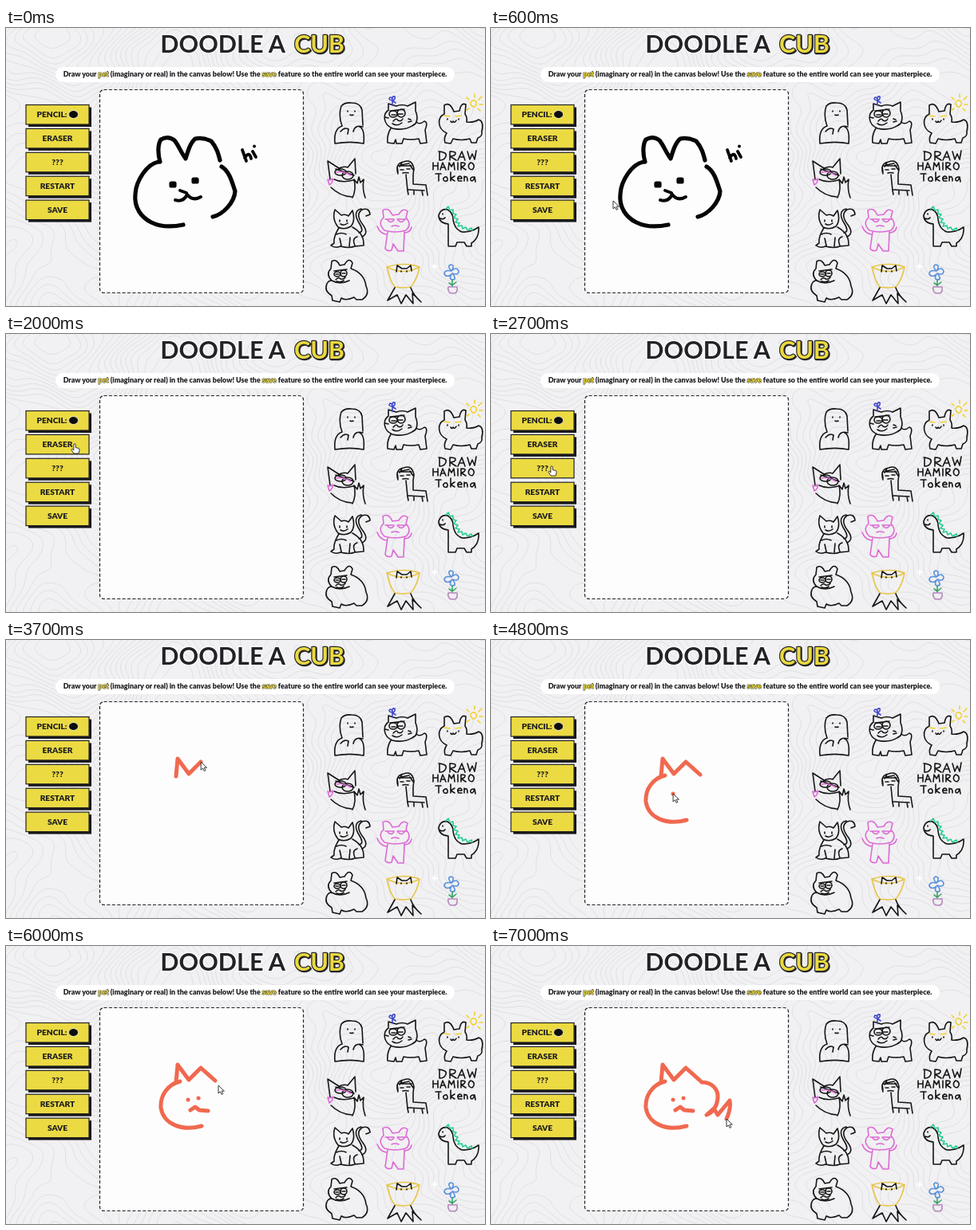
Animation, 600 px wide and 349 px high, one loop 7100 ms. Source, as an HTML page with a canvas:

```html
<!DOCTYPE html>
<html lang="en">
<head>
<meta charset="utf-8">
<title>Doodle a cub</title>
<style>
  html, body { margin: 0; width: 100%; height: 100%; overflow: hidden; background: #f1f0f2; }
  canvas, svg { position: absolute; left: 0; top: 0; width: 100%; height: 100%; display: block; }
  text { font-family: Lato, "Open Sans", sans-serif; font-weight: 900; fill: #1c1c20; }
  .title { font-size: 30.5px; font-weight: 700; paint-order: stroke; stroke-linejoin: round; }
  .dark { fill: #222228; stroke: #fff; stroke-width: 3px; }
  .gold { fill: #ead93f; stroke: #26262a; stroke-width: 2.4px; }
  .shade { fill: #26262a; }
  .intro { font-size: 8.92px; }
  .intro tspan { fill: #e6d43c; stroke: #333328; stroke-width: .9px; paint-order: stroke; }
  .button text { font-size: 10.2px; text-anchor: middle; }
  .line { fill: none; stroke: #151515; stroke-linecap: round; stroke-linejoin: round; }
  #pets { stroke-width: 1.6; }
  #bunny { stroke-width: 5.2; stroke: #060606; }
  #ink { stroke: #f0694f; stroke-width: 5; }
  .cursor { fill: #fff; stroke: #222; stroke-width: .9; stroke-linejoin: round; }
</style>
</head>
<body>
<canvas id="map" width="600" height="349"></canvas>
<svg viewBox="0 0 600 349" preserveAspectRatio="none">
  <text class="title dark" x="350" y="31" text-anchor="end">DOODLE A</text>
  <text class="title gold shade" x="362" y="32">CUB</text>
  <text class="title gold" x="361" y="31">CUB</text>
  <rect x="62" y="49" width="500" height="19" rx="9.5" fill="#fff"/>
  <text class="intro" x="312" y="61.3" text-anchor="middle">Draw your <tspan>pet</tspan> (imaginary or real) in the canvas below! Use the <tspan>save</tspan> feature so the entire world can see your masterpiece.</text>
  <rect x="117.5" y="77.5" width="255" height="255" rx="5" fill="#fefdfe" stroke="#222" stroke-width="1.2" stroke-dasharray="4 2.4"/>
  <g id="buttons"></g>
  <g id="pets" class="line"></g>
  <path d="M537,294l1,4l4,1l-4,1.5l-1,4l-1.5,-4l-4,-1.5l4,-1z" fill="#fff"/>
  <g id="bunny" class="line">
    <path d="M191,168C176,171 163,192 162,208C160,226 170,238 182,244C194,250 208,250 222,247"/>
    <path d="M193,168C190,158 190,146 194,140Q203,135 211,141C216,147 219,156 225,164C228,154 231,144 237,139Q247,137 257,142C264,150 266,158 268,166"/>
    <path d="M270,174C280,180 283,193 287,205C286,219 272,234 259,237"/>
    <path d="M207,195h4v3h-4zM235,190h4v3h-4z"/>
    <path d="M212,216Q222,219 227,209Q234,218 244,212M218,204L226,207L227,210" stroke-width="4"/>
    <path d="M296,153L301,167M299,163Q305,154 307,164M309,155l4,7M311,148.500h.1" stroke-width="3.8"/>
  </g>
  <g id="ink" class="line"></g>
  <path id="arrow" class="cursor" d="M0,0v10l2.400,-2.200l1.700,3.600l1.700,-.8l-1.700,-3.500h3.300z"/>
  <path id="hand" class="cursor" d="M-1.200,0.500Q0,-1 1.200,.5V4.500L5,5.500Q6.500,6 6,8L5,12H-1L-4,7.500Q-4,6 -2.500,6.500L-1.200,8z"/>
</svg>
<script>
const LOOP = 7100, FRAME = 100;
const $ = id => document.getElementById(id);
const clamp = v => Math.max(0, Math.min(1, v));

function add(parent, tag, attrs, text) {
  const el = document.createElementNS('http://www.w3.org/2000/svg', tag);
  for (const key in attrs) el.setAttribute(key, attrs[key]);
  if (text) el.textContent = text;
  parent.append(el);
  return el;
}

// Contour lines of a smooth field, by marching squares
function drawMap() {
  const ctx = $('map').getContext('2d'), step = 4;
  const field = (x, y) => {
    const u = x + 14 * Math.sin(y / 23) + 6 * Math.sin(y / 9 + x / 31);
    const v = y + 13 * Math.sin(x / 27) + 5 * Math.cos(x / 11 - y / 19);
    return 3.2 * (Math.sin(u / 43) + Math.cos(v / 37) + Math.sin((u + v) / 61) + .5 * Math.cos((u - 2 * v) / 53));
  };
  ctx.strokeStyle = '#e0dfe3';
  ctx.beginPath();
  for (let y = 0; y < 349; y += step) for (let x = 0; x < 600; x += step) {
    const c = [[x, y], [x + step, y], [x + step, y + step], [x, y + step]];
    const f = c.map(p => field(...p));
    for (let level = Math.ceil(Math.min(...f)); level <= Math.max(...f); level++) {
      const cuts = [];
      for (let i = 0; i < 4; i++) {
        const j = (i + 1) % 4;
        if ((f[i] < level) === (f[j] < level)) continue;
        const k = (level - f[i]) / (f[j] - f[i]);
        cuts.push([c[i][0] + k * (c[j][0] - c[i][0]), c[i][1] + k * (c[j][1] - c[i][1])]);
      }
      if (cuts.length > 1) {
        ctx.moveTo(...cuts[0]);
        ctx.lineTo(...cuts[1]);
      }
    }
  }
  ctx.stroke();
}

// Label, then when the pointer enters and leaves, if it does
const buttons = [
  ['PENCIL:', 1100, 1600], ['ERASER', 1750, 2150], ['???', 2350, 2900], ['RESTART', 750, 1150], ['SAVE']
].map(([label, enter = LOOP, leave = LOOP], i) => {
  const y = 96.5 + 29.9 * i;
  const g = add($('buttons'), 'g', { class: 'button' });
  const box = { x: 25, y, width: 79, height: 24.5 };
  const shadow = add(g, 'rect', { ...box, fill: '#17171a' });
  add(g, 'rect', { ...box, fill: '#ebda42', stroke: '#222', 'stroke-width': 1.2 });
  add(g, 'text', { x: i ? 64.5 : 57.5, y: y + 15.5 }, label);
  if (!i) add(g, 'ellipse', { cx: 84.5, cy: 108.5, rx: 6, ry: 5, fill: '#0c0c0c', stroke: '#f6f0c0' });
  return { shadow, enter, leave };
});

const BLUE = '#3f48cc', SKY = '#5b92dc', PINK = '#dd6ad6', GOLD = '#e8c648', SUN = '#f2d230', GREEN = '#22cf8e';
// Each pet: path, or [path, colour], in drawing order
const pets = [
  ['M421,123C417,113 418,103 420,98Q424,93 433,94Q444,94 446,103L447,122M421,123C412,126 411,135 412,145C424,143 438,143 448,145C449,134 448,126 443,124M419,130Q424,124 429,127L428,133M447,124Q437,121 435,130M428,104v1M437,104v1M431,109q2,1 4,0'],
  ['M484,126C472,121 472,108 479,103L479,95L489,98Q496,95 503,98L513,93L513,104Q517,113 513,120Q500,130 484,126M514,118Q518,122 524,117Q529,118 525,128L527,144L519,145L517,139Q506,141 498,139L496,145H489L488,140L486,145L478,144Q477,134 482,126',
   'M480,108a5,4 0 1 0 10,0a5,4 0 1 0 -10,0M490,107a5,5 0 1 0 10,0a5,5 0 1 0 -10,0M481,104L499,102M483,109h5M491,108h6M485,117q4,-5 6,-1q4,2 6,-2M484,120q6,4 12,-1M475,112l4,1M504,114l3,1M504,118l4,-1',
   ['M484,97v-6M484,91q-6,-1 -3,-4q3,0 3,4q-1,-6 3,-5q1,4 -3,5l4,3', BLUE]],
  ['M552,132C541,127 539,113 549,108L549,97Q556,92 561,105L568,104Q570,93 576,96L575,108Q578,112 577,118Q586,119 592,115Q599,117 596,130Q597,136 591,138L589,144H583L581,139Q570,142 560,139L557,145L550,144Q548,138 552,132M553,114v1M567,114v1M557,117q2,3 3,0q2,3 4,-1',
   ['M549,110l7,1M563,111l7,-1M582,95q0,-5 5,-4q5,3 0,8q-4,0 -5,-4M587,87v-4M592,90l4,-4M593,96h4M591,101l3,3M580,101l-3,2M580,90l-3,-3', SUN]],
  ['M406,190L403,167L417,176Q424,173 428,175L437,164L438,183M412,181a7,4 0 1 0 14,0a7,4 0 1 0 -14,0M421,185a7,5 0 1 0 14,0a7,5 0 1 0 -14,0M413,177L436,185M407,200Q418,211 433,212M434,213Q439,203 436,190l4,5l2,-8l2,7l4,-4Q446,202 450,213M411,190q10,5 24,1',
   ['M403,190q4,2 6,-1q1,5 -4,8zM414,181q8,-2 18,4', PINK]],
  ['M491,183Q487,170 498,168Q509,164 511,177L510,184M491,181l-1,-7M493,174l3,-5M495,172l10,-2M506,172l4,6M494,178h4M502,177h4M497,182q4,-1 7,0M501,184L503,204L504,209M510,184L510,196L526,197L528,210M504,203L524,204M511,204V209M521,204L522,210M492,173L508,173'],
  ['M543,155v11M542,155Q553,156 551,161Q549,166 543,166M556,166v-11q8,0 7,3q-1,3 -7,3l8,5M566,166l5,-11l4,11M568,162h6M578,155l3,10l3,-7l3,7l2,-11',
   'M535,169v9M541,169v9M535,173h6M544,178l3,-9l4,9M545,175h5M554,178l1,-9l3,5l3,-5l1,9M566,169v9M570,178v-9q6,0 5,2q-1,3 -5,3l6,4M582,169q-4,3 -2,7q4,4 6,-1q1,-5 -4,-6',
   'M538,183h7M542,183v9M550,187q-4,2 -1,5q5,1 4,-3q-1,-3 -3,-2M557,181v11M562,186l-5,3l5,3M566,189h5q0,-3 -3,-3q-4,2 -1,6h4M574,192v-6M574,188q4,-4 4,4M586,187q-5,0 -4,4q3,3 5,-4l1,6'],
  ['M416,250Q408,240 412,228L420,235Q425,233 429,236L434,229Q438,242 432,249Q424,254 416,250M417,251Q410,262 411,270L407,273Q412,277 419,274Q430,277 437,274L448,273Q449,258 434,250M418,241v2M427,241v2M419,246q4,3 9,-1M420,273l-2,-9M430,274l1,-11M437,273Q433,264 440,262M414,259q6,-3 12,0',
   'M446,262Q455,258 447,247Q437,234 446,228Q455,225 456,234L451,236M442,257Q449,256 443,246Q433,230 445,227'],
  ['M474,254Q465,245 473,238L472,229Q479,224 484,235L492,234Q497,225 503,230L501,238Q509,247 501,254Q487,258 474,254M475,240h11M490,240h12M478,241q4,5 8,0M491,241q4,5 8,0M483,249q4,-2 9,0M478,256L475,277Q478,281 483,279L485,271L491,280H498L499,256M477,259Q468,258 465,249M500,257Q507,256 508,250', PINK].slice(0, 0)
].slice(0, 7).concat([
  [['M474,254Q465,245 473,238L472,229Q479,224 484,235L492,234Q497,225 503,230L501,238Q509,247 501,254Q487,258 474,254M475,240h11M490,240h12M478,241q4,5 8,0M491,241q4,5 8,0M483,249q4,-2 9,0M478,256L475,277Q478,281 483,279L485,271L491,280H498L499,256M477,259Q468,258 465,249M500,257Q507,256 508,250', PINK]],
  ['M554,273L554,246Q542,245 542,235Q545,226 553,228Q560,232 560,240Q561,252 571,256Q582,257 592,250Q593,264 583,270V274H577L574,269H565L563,274H554M547,233v1M544,239q4,2 6,-1',
   ['M551,227l3,-3l2,5l4,-1l0,5l4,1l-3,4l5,2l-3,4l5,1l-2,4l5,-1l1,4l4,-2l2,4l5,-3l1,3', GREEN]],
  ['M408,317Q400,309 407,302L408,293Q414,289 418,298L424,297Q430,287 434,295L432,302Q449,308 451,324Q456,335 446,341H439L436,338Q426,343 420,339L418,344L409,342L408,336Q398,330 402,321Q404,317 408,317Q418,323 430,317',
   'M411,309a4,3 0 1 0 8,0a4,3 0 1 0 -8,0M419,308a4,4 0 1 0 8,0a4,4 0 1 0 -8,0M411,305L427,303M413,309h4M421,308h4M413,316q4,-4 6,-1q4,1 6,-2M414,318q5,2 9,-1'],
  [['M477,300Q498,293 518,300Q498,311 477,300Q481,318 487,325Q497,327 507,325Q515,316 518,300', GOLD],
   'M489,306L490,298L496,302H502L507,298L508,305M495,305v1M502,305v1M487,326L478,342L490,335L495,346L501,335L510,346L509,333L520,344Q510,335 507,326'],
  [['M558,305q-6,-6 -1,-8q6,1 1,8q6,-6 9,0q0,6 -8,3q6,7 1,8q-6,0 -2,-7q-6,5 -9,0q0,-6 9,-4', SKY],
   ['M559,316v8M559,323l-4,-3M559,323l5,-4', '#35a565'],
   ['M554,325h11q1,7 -3,8h-5q-4,-2 -3,-8', '#b487bd']]
]);
for (const pet of pets) {
  const g = add($('pets'), 'g', {});
  for (const part of pet) {
    const [d, color] = [].concat(part);
    add(g, 'path', color ? { d, stroke: color } : { d });
  }
}

// Pointer track: start, end, path, and whether it leaves ink
const track = [
  [100, 800, 'M330,235Q200,235 84,199'],
  [1000, 1200, 'M84,199L97,97'],
  [1500, 1900, 'M97,97L86,138'],
  [2100, 2500, 'M86,138L76,166'],
  [2800, 3200, 'M76,166Q140,190 213,172'],
  [3250, 3860, 'M213,171L215,149L229,168L244,153L262,169', 1],
  [3860, 4000, 'M262,169L218,170'],
  [4020, 4580, 'M218,170C202,174 193,188 194,203C197,223 219,233 245,226', 1],
  [4600, 4750, 'M245,226L228,193'],
  [4760, 4800, 'M228,193h.1', 1],
  [4900, 5020, 'M228,193L241,191'],
  [5030, 5080, 'M241,191h.1', 1],
  [5100, 5250, 'M241,191L231,206'],
  [5270, 5650, 'M231,206L237,202L242,206L253,207', 1],
  [5700, 6000, 'M253,207L266,175'],
  [6000, 6080, 'M266,175L264,171'],
  [6100, 7000, 'M264,171C277,171 285,180 284,191C283,203 277,209 270,212L279,204L284,212L299,194Q301,204 295,217', 1]
].map(([start, end, d, inked]) => {
  const path = add($('ink'), 'path', inked ? { d } : { d, stroke: 'none' });
  const length = path.getTotalLength();
  path.style.strokeDasharray = length + ' ' + (length + 10);
  return { start, end, path, length };
});

function render(t) {
  let spot, over = false;
  for (const { start, end, path, length } of track) {
    const k = clamp((t - start) / (end - start));
    path.style.visibility = t >= start ? 'visible' : 'hidden';
    path.style.strokeDashoffset = length * (1 - k);
    if (t >= start) spot = path.getPointAtLength(length * k);
  }
  for (const { shadow, enter, leave } of buttons) {
    const press = clamp((t - enter) / 100) * (1 - clamp((t - leave) / 300));
    const depth = 3 * (1 - press);
    shadow.setAttribute('transform', `translate(${depth},${depth})`);
    over = over || (t >= enter && t < leave);
  }
  for (const [id, shown] of [['hand', over], ['arrow', !over]]) {
    $(id).style.visibility = spot && shown ? 'visible' : 'hidden';
    if (spot) $(id).setAttribute('transform', `translate(${spot.x},${spot.y})`);
  }
  $('bunny').style.visibility = t < 1000 ? 'visible' : 'hidden';
}

function tick() {
  const t = performance.now() % LOOP;
  render(Math.floor(t / FRAME) * FRAME);
  requestAnimationFrame(tick);
}

drawMap();
tick();
</script>
</body>
</html>
```
